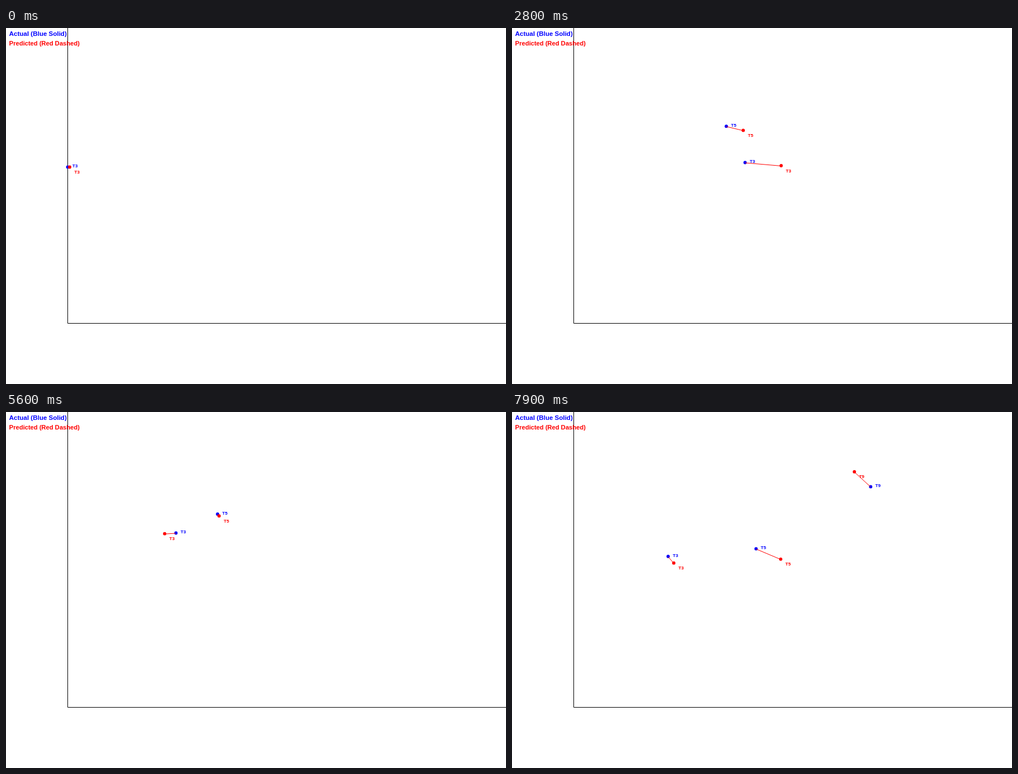
Recreate the animation shown at these times as an HTML page. Size 887 px wide and 631 px high, loop 8000 ms.

```html
<!DOCTYPE html>
<html lang="en">
<head>
<meta charset="utf-8">
<title>Actual and predicted tracks</title>
<style>
  html, body { margin: 0; width: 100%; height: 100%; overflow: hidden; background: #fff; }
  svg { display: block; width: 887px; height: 631px; }
  text { font: bold 8px "Liberation Sans", Arial, sans-serif; }
</style>
</head>
<body>
<svg id="stage" viewBox="0 0 887 631">
  <path d="M109.5 0V523.5H887" fill="none" stroke="#000"/>
  <g id="tracks"></g>
  <text x="5.5" y="14.3" fill="#00f" style="font-size:11.5px">Actual (Blue Solid)</text>
  <text x="5.5" y="31.3" fill="#f00" style="font-size:11.1px">Predicted (Red Dashed)</text>
</svg>
<script>
const LOOP = 8000, STEP = 100;
const LEAD = 6; // steps the prediction looks ahead

// Waypoints: step, position x and y, predicted shift x and y.
// A prediction extrapolates the current velocity, so the shift also sets the path's tangent.
const tracks = [
  { name: "T3", path: [
    [0, 109.5, 246.5, 3.5, 0], [1, 118, 248, 57, 7], [9, 211, 231, 71, -14],
    [20, 354, 233.5, 67, -3.3], [28, 413.5, 238.5, 64, 5.5], [39, 376, 232.3, -14, -12.8],
    [56, 301.5, 214.5, -20, 1.2], [65, 269, 211.3, -13, -5], [79, 277, 256, 10, 11.7]] },
  { name: "T5", path: [
    [27, 374.5, 173, 0, 0], [28, 380.2, 174.2, 30, 7.2], [39, 383, 177, 1, 4],
    [56, 375.3, 180.9, 2.7, 3.3], [65, 381.3, 190.8, 11.7, 12.7], [79, 433, 242.4, 43.7, 18.4]] },
  { name: "T9", path: [
    [63, 796, 204, 0, 0], [65, 767.8, 196.4, -98.8, -23.4], [79, 636.3, 132.4, -28.9, -26.5]] }
];

function add(parent, tag, attrs) {
  const node = document.createElementNS("http://www.w3.org/2000/svg", tag);
  return parent.appendChild(set(node, attrs));
}

function set(node, attrs = {}) {
  for (const key in attrs) node.setAttribute(key, attrs[key]);
  return node;
}

// Cubic Hermite position on one axis, with its derivative as velocity.
function follow(from, to, t, axis) {
  const span = to[0] - from[0], u = (t - from[0]) / span;
  const p = from[axis], rise = to[axis] - p;
  const a = from[axis + 2] / LEAD * span, b = to[axis + 2] / LEAD * span;
  const c2 = 3 * rise - 2 * a - b, c3 = a + b - 2 * rise;
  const actual = p + u * (a + u * (c2 + u * c3));
  const velocity = (a + u * (2 * c2 + 3 * u * c3)) / span;
  return { actual, predicted: actual + velocity * LEAD };
}

function marker(parent, fill, name, labelY) {
  const group = add(parent, "g", { fill });
  add(group, "circle", { r: 2.9 });
  add(group, "text", { x: 8.3, y: labelY }).textContent = name;
  return group;
}

for (const track of tracks) {
  track.group = add(document.getElementById("tracks"), "g");
  track.blue = marker(track.group, "#00f", track.name, 0.8);
  track.line = add(track.group, "line", { stroke: "#f00", transform: "translate(0 .5)" });
  track.red = marker(track.group, "#f00", track.name, 11.6);
}

function render(ms) {
  const t = Math.floor(ms % LOOP / STEP);
  for (const { group, blue, line, red, path } of tracks) {
    const visible = t >= path[0][0];
    set(group, { display: visible ? "inline" : "none" });
    if (!visible) continue;
    const end = Math.max(1, path.findIndex(point => point[0] >= t));
    const [x, y] = [1, 2].map(axis => follow(path[end - 1], path[end], t, axis));
    set(blue, { transform: `translate(${x.actual} ${y.actual})` });
    set(red, { transform: `translate(${x.predicted} ${y.predicted})` });
    set(line, { x1: x.actual, y1: y.actual, x2: x.predicted, y2: y.predicted });
  }
}

let start;
function tick(now) {
  start ??= now;
  render(now - start);
  requestAnimationFrame(tick);
}
render(0);
requestAnimationFrame(tick);
</script>
</body>
</html>
```
